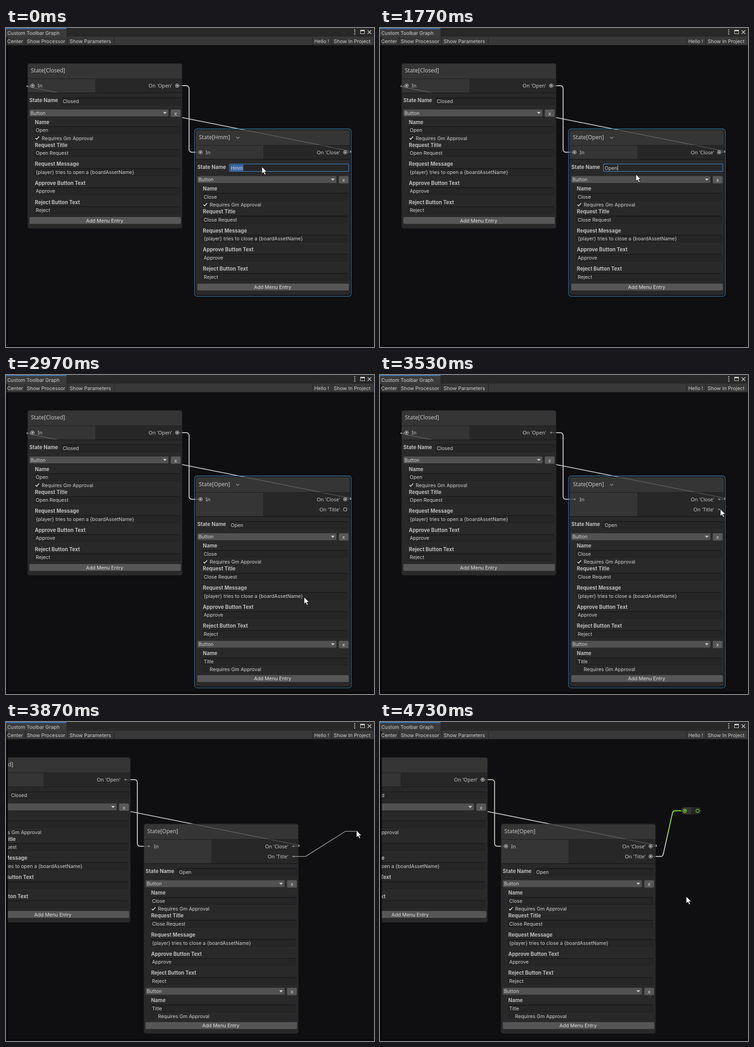
Write an HTML page with a canvas that moves like this. It is 804x697 px and loops after 4.77 s.

```html
<!DOCTYPE html>
<html lang="en">
<head>
<meta charset="utf-8">
<title>State graph editor</title>
<style>
html, body { margin: 0; width: 100%; height: 100%; overflow: hidden; background: #0f0e11; }
canvas { display: block; }
</style>
</head>
<body>
<canvas width="804" height="697"></canvas>
<script>
const ctx = document.querySelector('canvas').getContext('2d');
const LOOP = 4770;
const BODY = '10.7px Inter, sans-serif';
const BOLD = '700 11.1px Inter, sans-serif';
const BAR = '10.9px Inter, sans-serif';
const TITLE = '12px "Noto Sans", sans-serif';
const PORT = '11px "Noto Sans", sans-serif';
const LIGHT = '#c8c8c8', LABEL = '#bdbdbd', GREEN = '#86ee24', BLUE = '#3d7fc0';

const NODE_W = 338, ROW = 22.3;
const FULL_H = 235, SHORT_H = 75;

// Moments of the hard changes
const ADDED = 2760, DRAG = 3450, DESELECT = 3570, DROP = 4170;

const typing = [[0, 'Hmm'], [730, 'O'], [790, 'Op'], [850, 'Ope'], [910, 'Open']];
const pointer = [
  [0, 559, 303], [1769, 559, 303], [1770, 559, 319], [2000, 574, 432], [2230, 595, 557],
  [2400, 601, 569], [2830, 601, 569], [3080, 690, 420], [3300, 752, 304], [3400, 743, 293],
  [3530, 743, 293], [3600, 782, 279], [3730, 786, 266], [3870, 766, 237], [4000, 716, 208],
  [4130, 661, 189], [4430, 660, 192], [4580, 666, 290], [4730, 669, 381]
];
const panning = [[0, 0], [3590, 0], [3730, -55.5], [3870, -112.7], [3965, -149.7]];

function sample(track, t) {
  const i = track.findIndex(key => key[0] > t);
  if (i < 0) return track[track.length - 1].slice(1);
  const a = track[i - 1], b = track[i];
  const k = (t - a[0]) / (b[0] - a[0]);
  return a.slice(1).map((v, n) => v + (b[n + 1] - v) * k);
}

function text(str, x, cy, font = BODY, color = '#d0d0d0', align = 'left') {
  ctx.font = font;
  ctx.fillStyle = color;
  ctx.textAlign = align;
  ctx.fillText(str, x, cy + 4);
}

function rect(x, y, w, h, color) {
  ctx.fillStyle = color;
  ctx.fillRect(x, y, w, h);
}

function rounded(x, y, w, h, r, fill, stroke, width = 1) {
  ctx.beginPath();
  ctx.roundRect(x, y, w, h, r);
  if (fill) { ctx.fillStyle = fill; ctx.fill(); }
  if (stroke) { ctx.strokeStyle = stroke; ctx.lineWidth = width; ctx.stroke(); }
}

function line(points, color, width, radius = 0) {
  ctx.beginPath();
  ctx.moveTo(...points[0]);
  for (let i = 1; i < points.length - 1; i++) ctx.arcTo(...points[i], ...points[i + 1], radius);
  ctx.lineTo(...points[points.length - 1]);
  ctx.strokeStyle = color;
  ctx.lineWidth = width;
  ctx.stroke();
}

function dot(x, y, r, color) {
  ctx.beginPath();
  ctx.arc(x, y, r, 0, 7);
  ctx.fillStyle = color;
  ctx.fill();
}

function port(x, y, { dim, linked = true, color = LIGHT }) {
  if (dim) {
    line([[x - 4, y], [x + 4, y]], '#4c4c4c', 1);
    dot(x, y, 1.9, '#858585');
    return;
  }
  dot(x, y, 4.2, '#1c1c1c');
  ctx.beginPath();
  ctx.arc(x, y, 3.7, 0, 7);
  ctx.strokeStyle = color;
  ctx.lineWidth = 1.2;
  ctx.stroke();
  if (linked) dot(x, y, 2, color);
}

function field(x, cy, w, value) {
  rounded(x + .5, cy - 7.5, w - 1, 15, 2, '#262627', '#202021');
  rect(x + 1, cy - 8, w - 2, 1, '#131314');
  text(value, x + 3, cy);
}

function triangle(x, y) {
  ctx.beginPath();
  ctx.moveTo(x - 4, y - 2);
  ctx.lineTo(x + 4, y - 2);
  ctx.lineTo(x, y + 2.5);
  ctx.fillStyle = '#d0d0d0';
  ctx.fill();
}

function entry(cy, { name, message }) {
  rounded(4, cy - 7.5, 304, 15, 2, '#515152');
  text('Button', 6.5, cy);
  triangle(300, cy);
  rounded(313, cy - 7.5, 21.5, 16, 2, '#585859');
  text('x', 323.7, cy + 1, BODY, '#e0e0e0', 'center');

  text('Name', 16, cy + 20, BOLD, LABEL);
  field(15, cy + 37.5, 318, name);
  rounded(16.5, cy + 50, 10, 10, 2, '#262627', '#202021');
  if (message) line([[17.5, cy + 55], [20, cy + 57.8], [25.5, cy + 51.5]], '#e8e8e8', 1.6);
  text('Requires Gm Approval', 31, cy + 55);
  if (!message) return;

  const rows = [['Request Title', name + ' Request'], ['Request Message', message],
    ['Approve Button Text', 'Approve'], ['Reject Button Text', 'Reject']];
  rows.forEach(([label, value], i) => {
    const y = cy + 70 + i * 41.7;
    text(label, 16, y, BOLD, LABEL);
    field(15, y + 17.5, 318, value);
  });
}

function stateField(cy, node) {
  text('State Name', 4, cy, BOLD, LABEL);
  field(74, cy + 2, 261, node.focused ? '' : node.state);
  if (!node.focused) return;
  rounded(74.2, cy - 6.4, 260.8, 16.2, 2, '#262627', BLUE, 1.3);
  ctx.font = BODY;
  const w = ctx.measureText(node.state).width;
  if (node.selectedText) rect(76, cy - 5, w + 2, 14, '#3f68a8');
  text(node.state, 77, cy + 2);
  if (!node.selectedText) rect(77.5 + w, cy - 4, 1, 12, '#dcdcdc');
}

function drawNode(node) {
  const shift = (node.outs.length - 1) * ROW;
  const bodyY = 64 + shift, first = 108.5 + shift;
  const addY = first + node.entries.reduce((h, e) => h + (e.message ? FULL_H : SHORT_H), 0);
  const height = addY + 17.5;
  const title = `State[${node.state}]`;

  ctx.save();
  ctx.translate(node.x, node.y);
  ctx.save();
  ctx.beginPath();
  ctx.roundRect(0, 0, NODE_W, height, 5);
  ctx.clip();
  rect(0, 0, NODE_W, 34, 'rgba(63,63,63,.8)');
  rect(0, 34, 148, bodyY - 34, 'rgba(63,63,63,.8)');
  rect(148, 34, NODE_W - 148, bodyY - 34, 'rgba(46,46,46,.8)');
  rect(0, bodyY, NODE_W, height - bodyY, '#29292a');
  rect(0, 33.5, NODE_W, 1, '#1d1d1e');
  rect(0, bodyY, NODE_W, 1.5, '#1b1b1c');
  ctx.restore();
  rounded(.5, .5, NODE_W - 1, height - 1, 5, null, '#252526');

  text(title, 7.5, 16.3, TITLE, LIGHT);
  if (node.selected) {
    const x = 7.5 + ctx.measureText(title).width + 17;
    line([[x - 3.5, 15.5], [x, 19], [x + 3.5, 15.5]], '#a0a0a0', 1.2);
    rounded(-2, -2, NODE_W + 4.2, height + 4.8, 6, null, '#37769a', 1.3);
  }

  port(11, 49, { dim: node.dimIn });
  text('In', 22, 49, PORT, LIGHT);
  node.outs.forEach((out, i) => {
    const y = 49 + i * ROW;
    text(`On '${out.name}'`, 316, y, PORT, LIGHT, 'right');
    port(327, y, { dim: node.dimOut, linked: out.linked });
  });

  stateField(bodyY + 17, node);
  let y = first;
  for (const item of node.entries) {
    entry(y, item);
    y += item.message ? FULL_H : SHORT_H;
  }
  rounded(4, addY - 7.5, 331, 15, 2, node.hover ? '#6b686b' : '#565657');
  text('Add Menu Entry', 168.5, addY, BODY, '#e0e0e0', 'center');
  ctx.restore();
}

function drawRelay(x, y) {
  rounded(x - 8, y - 8, 44, 16, 8, '#262627');
  rounded(x - 8, y - 8, 22, 16, [8, 0, 0, 8], '#343435');
  port(x, y, { color: GREEN });
  port(x + 28, y, { color: GREEN, linked: false });
}

function drawGraph(t, mx, my) {
  const [pan] = sample(panning, t);
  const dragging = t >= DRAG && t < DROP;
  const added = t >= ADDED;
  const state = typing.filter(step => step[0] <= t).pop()[1];

  const closed = {
    x: 47 + pan, y: 77, state: 'Closed', dimOut: dragging,
    outs: [{ name: 'Open', linked: true }],
    entries: [{ name: 'Open', message: '{player} tries to open a {boardAssetName}' }]
  };
  const open = {
    x: 414 + pan, y: 222.5, state, dimIn: dragging, dimOut: dragging,
    selected: t < DESELECT, focused: !added, selectedText: t < 730,
    hover: t >= 2230 && !added,
    outs: [{ name: 'Close', linked: true }],
    entries: [{ name: 'Close', message: '{player} tries to close a {boardAssetName}' }]
  };
  if (added) {
    open.outs.push({ name: 'Title', linked: t >= DROP });
    open.entries.push({ name: 'Title' });
  }

  ctx.save();
  ctx.beginPath();
  ctx.rect(4, 38, 800, 655);
  ctx.clip();

  const at = (x, y) => [x + pan, y];
  line([at(374, 126), at(400, 126), at(400, 271.5), at(425, 271.5)], LIGHT, 2, 6);
  line([at(741, 271.5), at(753.5, 271.5), at(753.5, 269.3), at(46, 128), at(46, 126.5), at(58, 126.5)],
    LIGHT, 1.8, .5);

  const start = at(741, 293.8), elbow = at(767.5, 293.8);
  if (t >= DROP) {
    const fade = ctx.createLinearGradient(0, 294, 0, 194);
    fade.addColorStop(0, LIGHT);
    fade.addColorStop(.25, LIGHT);
    fade.addColorStop(.75, GREEN);
    fade.addColorStop(1, GREEN);
    line([start, elbow, [640, 194], [666, 194]], fade, 2, 6);
  }

  drawNode(closed);
  drawNode(open);
  if (dragging && t > 3535) {
    const end = [mx + 2, my + 2];
    line([start, elbow, [end[0] - 26, end[1]], end], '#929292', 1.6, 2);
  }
  if (t >= DROP) drawRelay(666, 194);
  ctx.restore();
}

function drawWindow() {
  rect(0, 0, 804, 697, '#0f0e11');
  rect(0, 38, 4, 659, '#08080a');
  rect(0, 693, 804, 4, '#08080a');
  rect(0, 0, 804, 19, '#282829');
  rect(0, 0, 132, 19, '#3b3b3c');
  rect(0, 0, 132, 2, '#3a79bb');
  text('Custom Toolbar Graph', 3, 11);

  rect(0, 19, 804, 19, '#383839');
  rect(0, 19, 4, 19, '#1c1c1d');
  rect(0, 37, 804, 1, '#202021');
  for (const x of [41, 134, 236, 669, 711, 802]) rect(x, 19, 1, 19, '#222223');
  const labels = [['Center', 2.5], ['Show Processor', 45.5], ['Show Parameters', 139],
    ['Hello !', 673.5], ['Show In Project', 716]];
  for (const [label, x] of labels) text(label, x, 28.5, BAR);

  for (const y of [4, 8.5, 13]) dot(762, y, 1.3, '#d0d0d0');
  ctx.strokeStyle = '#d0d0d0';
  ctx.lineWidth = 1;
  ctx.strokeRect(774.5, 4.5, 9, 8);
  rect(774, 4, 10, 3, '#d0d0d0');
  line([[790, 5], [798, 13]], '#d0d0d0', 1.5);
  line([[798, 5], [790, 13]], '#d0d0d0', 1.5);
}

function drawPointer(x, y) {
  const shape = new Path2D('M0 0V15.5L3.6 12.2L6.2 18L8.8 16.8L6.2 11.2H11Z');
  ctx.save();
  ctx.translate(x, y);
  ctx.fillStyle = '#fff';
  ctx.fill(shape);
  ctx.strokeStyle = '#111';
  ctx.lineWidth = 1;
  ctx.stroke(shape);
  ctx.restore();
}

const begin = performance.now();
function render() {
  const t = (performance.now() - begin) % LOOP;
  const [mx, my] = sample(pointer, t);
  drawWindow();
  drawGraph(t, mx, my);
  drawPointer(mx, my);
  requestAnimationFrame(render);
}
render();
</script>
</body>
</html>
```
